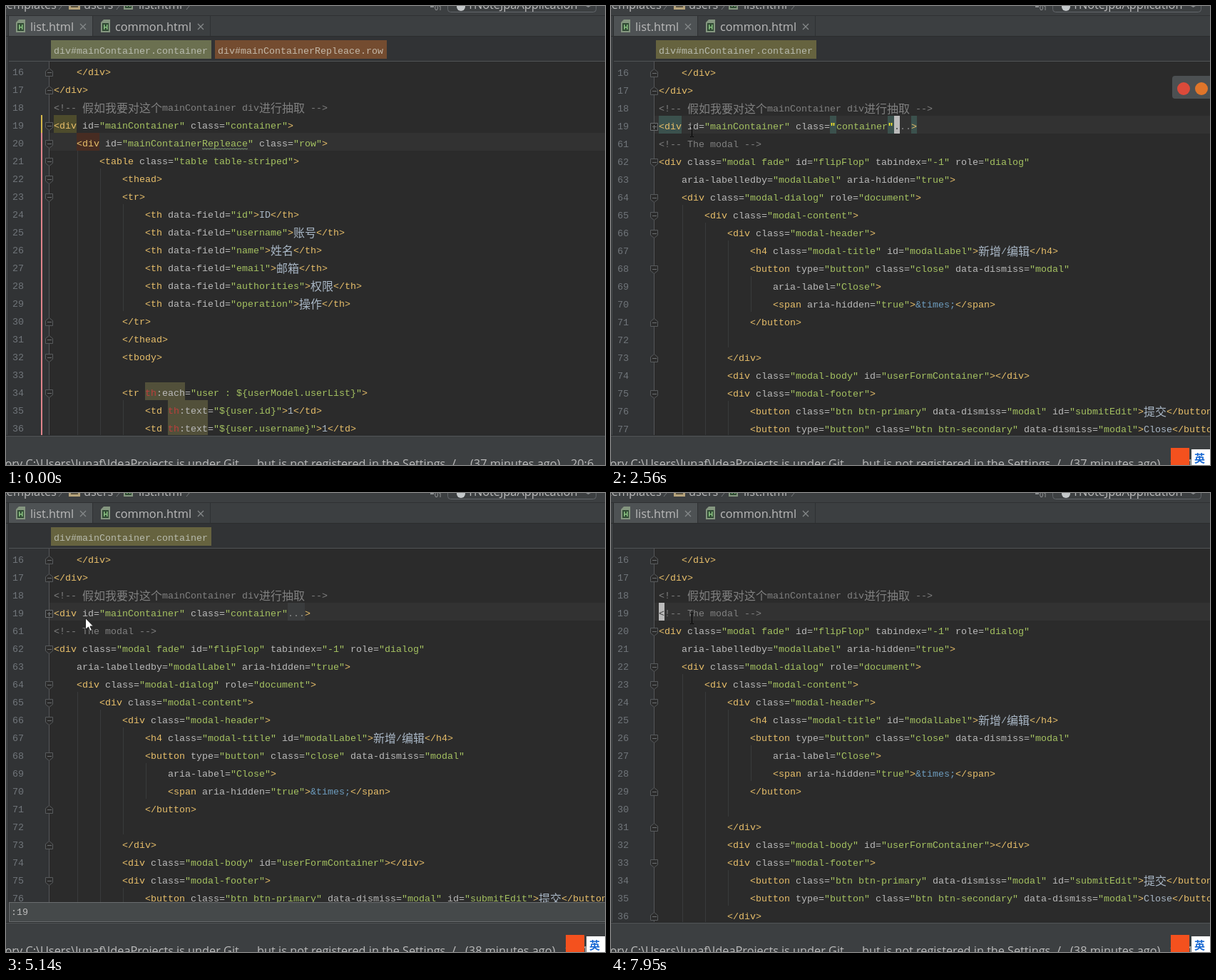
Recreate the animation shown at these times as an HTML page with a canvas. Size 840 by 644 pixels, loop 8000 ms.

```html
<!DOCTYPE html>
<html lang="en">
<head>
<meta charset="utf-8">
<title>Editor</title>
<style>
html, body { margin: 0; width: 100%; height: 100%; overflow: hidden; background: #2b2b2b; }
canvas { display: block; }
</style>
</head>
<body>
<canvas id="stage" width="840" height="644"></canvas>
<script>
const ctx = document.getElementById('stage').getContext('2d');
const LOOP = 8000, LEFT = 67, CELL = 8, ROW = 25;
const MONO = '13.333px "Liberation Mono", monospace';
const BOLD = 'bold ' + MONO;
const CJK = '300 16px "Noto Sans CJK SC", "Noto Sans CJK", sans-serif';
const UI = '16.3px "Open Sans", "Noto Sans", sans-serif';
const C = {
  tag: '#e8bf6a', attr: '#bababa', str: '#a5c261', text: '#a9b7c6',
  note: '#808080', entity: '#6d9cbe', bad: '#bc3f3c', panel: '#3c3f41', match: '#3b514d'
};

const HEAD = ['    </div>', '</div>', '<!-- 假如我要对这个mainContainer div进行抽取 -->'];
const OUTER = '<div id="mainContainer" class="container"';
const th = (field, label) => ' '.repeat(16) + `<th data-field="${field}">${label}</th>`;
const td = key => ' '.repeat(16) + '<td th:text="${user.' + key + '}">1</td>';
const TABLE = [
  OUTER + '>',
  '    <div id="mainContainerRepleace" class="row">',
  '        <table class="table table-striped">',
  '            <thead>',
  '            <tr>',
  th('id', 'ID'), th('username', '账号'), th('name', '姓名'),
  th('email', '邮箱'), th('authorities', '权限'), th('operation', '操作'),
  '            </tr>',
  '            </thead>',
  '            <tbody>',
  '',
  '            <tr th:each="user : ${userModel.userList}">',
  td('id'), td('username')
];
const MODAL = [
  '<!-- The modal -->',
  '<div class="modal fade" id="flipFlop" tabindex="-1" role="dialog"',
  '    aria-labelledby="modalLabel" aria-hidden="true">',
  '    <div class="modal-dialog" role="document">',
  '        <div class="modal-content">',
  '            <div class="modal-header">',
  '                <h4 class="modal-title" id="modalLabel">新增/编辑</h4>',
  '                <button type="button" class="close" data-dismiss="modal"',
  '                    aria-label="Close">',
  '                    <span aria-hidden="true">&times;</span>',
  '                </button>',
  '',
  '            </div>',
  '            <div class="modal-body" id="userFormContainer"></div>',
  '            <div class="modal-footer">',
  '                <button class="btn btn-primary" data-dismiss="modal" id="submitEdit">提交</button>',
  '                <button type="button" class="btn btn-secondary" data-dismiss="modal">Close</button>',
  '            </div>'
];

// folds: s = start, e = end, p = collapsed; guides: [column, first row, last row]
const VIEWS = {
  open: {
    lines: [...HEAD, ...TABLE], num: r => 16 + r, top: 78, caretRow: 4,
    folds: 'ee.sssss......ees.s..',
    guides: [[4, 5, 20], [8, 6, 20], [12, 8, 13], [12, 19, 20]]
  },
  folded: {
    lines: [...HEAD, '', ...MODAL.slice(0, 17)], num: r => r < 4 ? 16 + r : 57 + r, top: 79, caretRow: 3,
    folds: 'ee.p.s.sss.s..e.e.s..',
    guides: [[4, 8, 20], [8, 9, 20], [12, 10, 15], [16, 12, 13], [12, 19, 20]]
  },
  removed: {
    lines: [...HEAD, ...MODAL], num: r => 16 + r, top: 79, caretRow: 3,
    folds: 'ee..s.sss.s..e.e.s..e',
    guides: [[4, 7, 20], [8, 8, 20], [12, 9, 14], [16, 11, 12], [12, 18, 19]]
  }
};

function box(x, y, w, h, color) {
  ctx.fillStyle = color;
  ctx.fillRect(x, y, w, h);
}

function disc(x, y, r, color) {
  ctx.fillStyle = color;
  ctx.beginPath();
  ctx.arc(x, y, r, 0, 7);
  ctx.fill();
}

function poly(points, fill, stroke) {
  ctx.beginPath();
  points.forEach(([x, y]) => ctx.lineTo(x, y));
  ctx.closePath();
  if (fill) { ctx.fillStyle = fill; ctx.fill(); }
  if (stroke) { ctx.strokeStyle = stroke; ctx.lineWidth = 1; ctx.stroke(); }
}

function label(s, x, y, color = '#bbbbbb', font = UI, align = 'left') {
  ctx.font = font;
  ctx.fillStyle = color;
  ctx.textAlign = align;
  ctx.fillText(s, x, y);
  ctx.textAlign = 'left';
}

// Writes on the character grid and returns the end x.
function put(s, x, y, color, font = MONO) {
  ctx.fillStyle = color;
  for (const ch of s) {
    const wide = ch > '\u2e80';
    ctx.font = wide ? CJK : font;
    ctx.fillText(ch, x, y + (wide ? 2 : 0));
    x += wide ? 2 * CELL : CELL;
  }
  return x;
}

function codeLine(line, top) {
  const y = top + 19;
  let x = LEFT, inTag = /^\s*aria-/.test(line);
  for (const t of line.match(/<!--.*?-->|<\/?\w+|>|"[^"]*"|&\w+;|[\w:-]+|\s+|./g) || []) {
    let color = C.text;
    if (t.startsWith('<!--')) color = C.note;
    else if (t[0] === '<') { color = C.tag; inTag = true; }
    else if (t === '>') { color = C.tag; inTag = false; }
    else if (t[0] === '&') color = C.entity;
    else if (inTag) color = t[0] === '"' ? C.str : C.attr;
    if (inTag && t.startsWith('th:')) {
      box(x, top, t.length * CELL, ROW, '#52503a');
      x = put('th', x, y, C.bad);
      x = put(t.slice(2), x, y, color);
    } else x = put(t, x, y, color);
  }
  return x;
}

function foldMark(kind, y) {
  const edge = '#585b5d';
  if (kind === 'p') {
    poly([[55.5, y - 4.5], [65.5, y - 4.5], [65.5, y + 5.5], [55.5, y + 5.5]], '#2b2b2b', '#6c6f71');
    box(60, y - 2, 1, 6, '#85888a');
  } else {
    const d = kind === 's' ? 1 : -1, m = y + 0.5;
    poly([[55.5, m - 5 * d], [65.5, m - 5 * d], [65.5, m + 2 * d], [60.5, m + 6 * d], [55.5, m + 2 * d]], '#2b2b2b', edge);
  }
  box(58, y, 6, 1, '#6c6f71');
}

function wave(x0, x1, y) {
  ctx.strokeStyle = '#7f9a7a';
  ctx.lineWidth = 1;
  ctx.beginPath();
  for (let x = x0; x <= x1; x += 2) ctx.lineTo(x, y + (x - x0) % 4 / 2);
  ctx.stroke();
}

function foldedLine(top, lit) {
  const y = top + 19;
  if (!lit) {
    const x = codeLine(OUTER, top);
    box(x, top, 24, ROW, '#3a3c3d');
    put('>', put('...', x, y, '#8c8c8c'), y, C.tag);
    return;
  }
  box(LEFT, top, 32, ROW, C.match);
  const x = codeLine('<div id="mainContainer" class=', top);
  for (const q of [x, x + 81]) {
    box(q, top, 9, ROW, C.match);
    put('"', q, y, '#ffef28', BOLD);
  }
  put('container', x + 9, y, C.str);
  box(x + 90, top, 8, ROW, '#bbbbbb');
  put('.', x + 90, y, '#3a3a3a');
  put('..', x + 98, y, '#8c8c8c');
  box(x + 114, top, 8, ROW, C.match);
  put('>', x + 114, y, C.tag);
}

function editor(t) {
  const name = t < 1550 ? 'open' : t < 7650 ? 'folded' : 'removed';
  const v = VIEWS[name], rowTop = r => v.top + r * ROW;
  ctx.save();
  ctx.beginPath();
  ctx.rect(0, 78, 840, 524);
  ctx.clip();
  box(4, 78, 836, 524, '#2b2b2b');
  box(4, 78, 57, 524, '#313335');
  box(61, rowTop(v.caretRow), 779, ROW, '#323232');
  for (const [col, a, b] of v.guides)
    box(LEFT + 1 + col * CELL, rowTop(a), 1, (b - a + 1) * ROW, '#393b3c');
  box(60, 78, 1, 524, '#555759');
  if (name === 'open') {
    if (t >= 910) box(60, 168, 1, 434, '#8b8d8f');
    box(49, 178, 2, 424, '#e0858c');
    box(LEFT, rowTop(3), 32, ROW, '#4d4b2c');
    box(LEFT + 32, rowTop(4), 32, ROW, '#472c22');
  }
  if (t < 2180) box(49, 153, 2, ROW, '#d8b84a');
  v.lines.forEach((line, r) => {
    const top = rowTop(r);
    put(String(v.num(r)), 9, top + 19, '#70757a');
    if (v.folds[r] !== '.') foldMark(v.folds[r], top + 15);
    if (name === 'folded' && r === 3) foldedLine(top, t >= 2180 && t < 3270);
    else codeLine(line, top);
  });
  if (name === 'open') wave(275, 339, 200);
  if (name === 'removed') {
    box(LEFT, 154, 8, ROW, '#bbbbbb');
    put('<', LEFT, 173, '#3a3a3a');
  }
  ctx.restore();
}

function fileIcon(x, y) {
  poly([[x + 4, y], [x + 13, y], [x + 13, y + 18], [x, y + 18], [x, y + 4]], '#84967f');
  box(x + 2, y + 5, 9, 11, '#2f4a33');
  box(x + 4, y + 7, 1.5, 7, '#8cc383');
  box(x + 8, y + 7, 1.5, 7, '#8cc383');
  box(x + 5, y + 10, 3, 1.5, '#8cc383');
}

function cross(x, y) {
  ctx.strokeStyle = '#85888a';
  ctx.lineWidth = 1.3;
  ctx.beginPath();
  for (const d of [-4, 4]) {
    ctx.moveTo(x - 4, y - d);
    ctx.lineTo(x + 4, y + d);
  }
  ctx.stroke();
}

function chevron(x) {
  ctx.strokeStyle = '#777a7c';
  ctx.lineWidth = 1;
  ctx.beginPath();
  ctx.moveTo(x + 4, 0);
  ctx.lineTo(x, 5);
  ctx.stroke();
}

function header(t) {
  box(0, 0, 840, 78, C.panel);
  label('templates', -5, 4);
  chevron(74);
  box(88, -6, 16, 11, '#b5a27a');
  box(91, -4, 10, 6, '#5b5340');
  label('users', 109, 4);
  chevron(155);
  fileIcon(165, -13);
  label('list.html', 186, 4);
  chevron(253);
  label('01', 601, 6, '#afb1b3', '9px "Open Sans", sans-serif');
  box(595, 0, 5, 2, '#8a8d8f');
  ctx.strokeStyle = '#62666a';
  ctx.lineWidth = 1;
  ctx.beginPath();
  ctx.roundRect(619.5, -14.5, 208, 23, 4);
  ctx.stroke();
  disc(638, 1, 6, '#c4c8ca');
  label('TNoteJpaApplication', 647, 4);
  poly([[813, 0], [820, 0], [816.5, 2]], '#8a8d8f');

  box(0, 13, 840, 1, '#2f3133');
  box(4, 14, 117, 29, '#4e5254');
  box(121, 14, 1, 29, '#2f3133');
  box(286, 14, 1, 29, '#2f3133');
  fileIcon(14, 19);
  label('list.html', 34, 35);
  cross(108, 29);
  fileIcon(133, 19);
  label('common.html', 153, 35);
  cross(273, 29);
  box(0, 42, 840, 1, '#2b2d2e');

  box(4, 43, 836, 34, '#313335');
  box(4, 77, 836, 1, '#505355');
  if (t < 7950) {
    box(63, 48, 225, 26, t < 1790 ? '#6b7050' : '#66633f');
    put('div#mainContainer.container', 67, 67, '#b8bbae');
  }
  if (t < 1790) {
    box(293, 48, 241, 26, '#744c30');
    put('div#mainContainerRepleace.row', 297, 67, '#c4b8a8');
  }
  box(0, 43, 3, 601, C.panel);
  box(3, 14, 1, 589, '#2b2d2e');
}

function status(t) {
  const early = t < 1550;
  box(0, 602, 840, 42, C.panel);
  box(0, 602, 840, 1, '#292b2c');
  box(0, 603, 840, 1, '#515456');
  label('ory C:\\Users\\lunaf\\IdeaProjects', 235, 648, '#bbbbbb', UI, 'right');
  label('is under Git,', 239, 648);
  label('but is not registered in the', 552, 648, '#bbbbbb', UI, 'right');
  label('Settings. /...', 556, 648);
  label(`(${t < 4520 ? 37 : 38} minutes ago)`, early ? 651 : 644, 648);
  label(early ? '20:6' : '19:43', early ? 792 : 783, 648);
  if (t >= 1460) {
    box(814, 622, 26, 22, '#ffffff');
    box(785, 620, 26, 24, '#f4511e');
    label('英', 818, 640, '#1767d2', 'bold 15px "Noto Sans CJK SC", "Noto Sans CJK", sans-serif');
  }
}

// Latest step whose start time has passed.
const at = (steps, t) => steps.reduce((now, s) => t >= s[0] ? s : now, steps[0]);

const FADE = [[0, 0], [1790, 0.4], [1870, 0.7], [1950, 1], [3800, 0.8], [3900, 0.65], [4040, 0.5], [4130, 0]];
function browsers(t) {
  ctx.globalAlpha = at(FADE, t)[1];
  ctx.fillStyle = '#4c5052';
  ctx.beginPath();
  ctx.roundRect(787, 98, 60, 32, 4);
  ctx.fill();
  disc(803, 116, 9, '#db4a3a');
  disc(828, 116, 9, '#e0752a');
  ctx.globalAlpha = 1;
}

// [time, typed text, caret shown]
const TYPED = [
  [4040, ':', 1], [4430, ':1', 1], [4600, ':19', 1], [5140, ':19', 0], [5370, ':19,', 1],
  [5830, ':19,', 0], [6380, ':19,', 1], [6470, ':19,6', 1], [6560, ':19,60', 1],
  [7100, ':19,60', 0], [7260, ':19,60d', 1]
];
function command(t) {
  if (t < 4040 || t >= 7590) return;
  const [, text, caret] = at(TYPED, t);
  box(4, 574, 836, 28, '#6a6d6f');
  box(5, 575, 835, 26, '#45494a');
  const x = put(text, 7, 592, '#bbbbbb');
  if (caret) box(x - 1, 575, 1, 25, '#d8d8d8');
}

const SHAPES = {
  arrow(x, y) {
    const p = [[0, 0], [0, 16], [4, 12.5], [6.5, 18], [9, 17], [6.5, 11.5], [11, 11.5]];
    poly(p.map(([a, b]) => [x + a + 0.5, y + b + 0.5]), '#ffffff', '#222222');
  },
  hand(x, y) {
    const p = [[2, 1], [4, 1], [5, 7], [12, 9], [13, 14], [11, 20], [4, 20], [0, 13], [3, 12]];
    poly(p.map(([a, b]) => [x + a, y + b]), '#000000', '#0a0a0a');
  },
  beam(x, y) {
    box(x + 2, y + 1, 1, 14, '#050505');
    for (const d of [0, 15]) {
      box(x, y + d, 2, 1, '#050505');
      box(x + 3, y + d, 2, 1, '#050505');
    }
  },
  none() {}
};
const POINTER = [
  [0, 'none'], [70, 'arrow', 617, 615], [240, 'arrow', 390, 452], [300, 'arrow', 136, 269],
  [540, 'arrow', 122, 250], [610, 'arrow', 102, 225], [690, 'arrow', 80, 198], [760, 'arrow', 62, 175],
  [910, 'arrow', 62, 172], [1080, 'hand', 62, 172], [1870, 'beam', 70, 168], [2180, 'none'],
  [2560, 'beam', 111, 168], [3800, 'arrow', 111, 175], [7400, 'beam', 111, 168]
];

function draw(now) {
  const t = now % LOOP;
  header(t);
  editor(t);
  browsers(t);
  command(t);
  status(t);
  const [, shape, x, y] = at(POINTER, t);
  SHAPES[shape](x, y);
}

let start;
function tick(now) {
  start ??= now;
  draw(now - start);
  requestAnimationFrame(tick);
}
draw(0);
requestAnimationFrame(tick);
</script>
</body>
</html>
```
